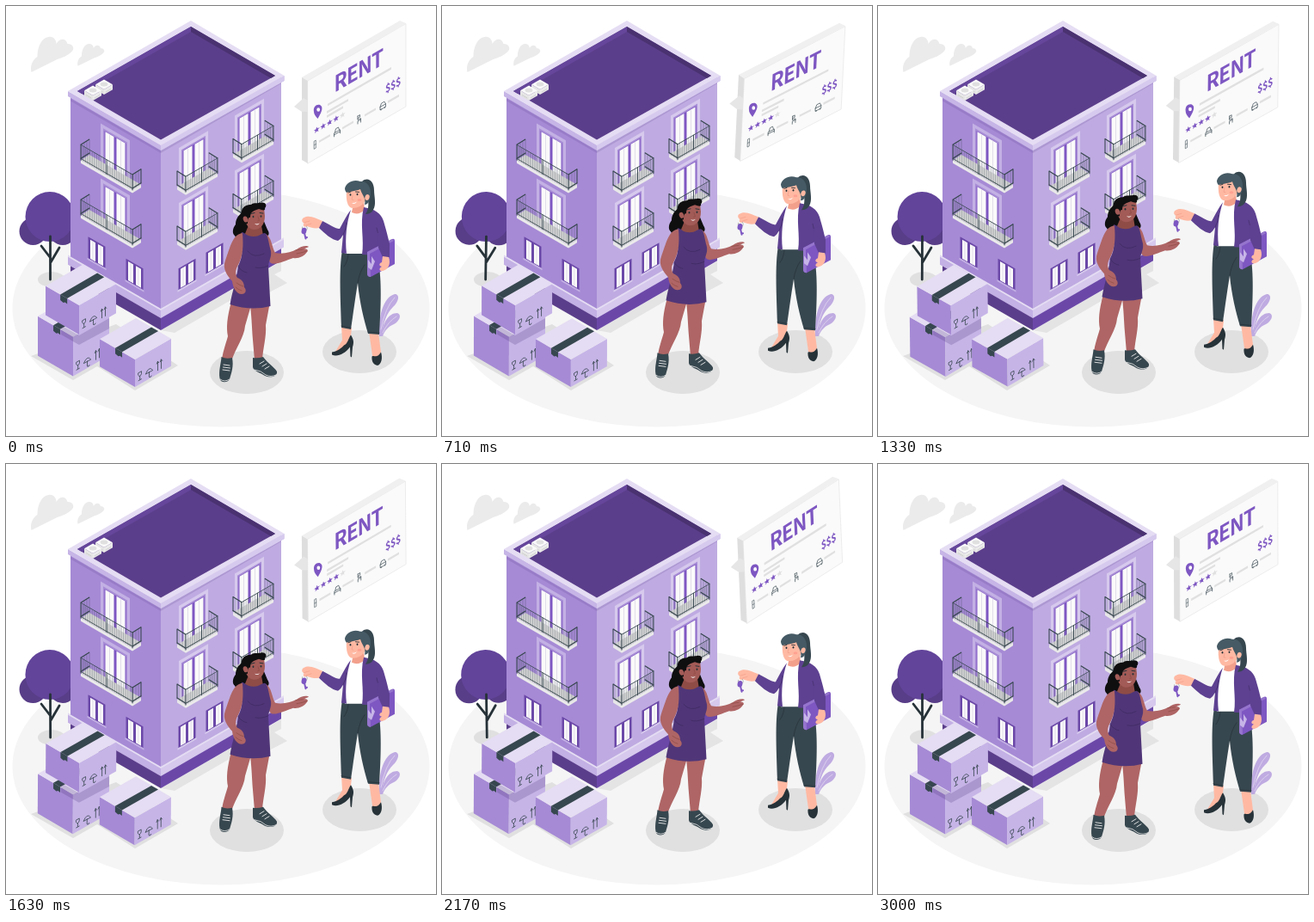
These frames come from a looping animation (500 px wide and 500 px high, 3040 ms). An HTML page with a canvas:

```html
<!DOCTYPE html>
<html lang="en">
<head>
<meta charset="utf-8">
<title>Rent</title>
<style>
html, body { margin: 0; width: 100%; height: 100%; overflow: hidden; background: #fff; }
canvas { display: block; width: 500px; height: 500px; }
</style>
</head>
<body>
<canvas id="stage"></canvas>
<script>
const LOOP = 3040, ISO = 0.577;
const canvas = document.getElementById('stage');
const c = canvas.getContext('2d');
const dpr = window.devicePixelRatio || 1;
canvas.width = canvas.height = 500 * dpr;

const BASE = '#7e57c2', DEEP = '#5b3e8b', DRESS = '#503678', PALE = '#e5ddf3',
  INK = '#263238', SLATE = '#37474f', GREY = '#e0e0e0';

// helpers
function fill(d, color) { c.fillStyle = color; c.fill(new Path2D(d)); }
function line(d, color, w = 1) {
  c.strokeStyle = color; c.lineWidth = w; c.lineCap = c.lineJoin = 'round';
  c.stroke(new Path2D(d));
}
function rect(x, y, w, h, color) { c.fillStyle = color; c.fillRect(x, y, w, h); }
function oval(x, y, rx, ry, color, turn = 0) {
  c.fillStyle = color; c.beginPath(); c.ellipse(x, y, rx, ry, turn, 0, 7); c.fill();
}
function at(x, y, draw) { c.save(); c.translate(x, y); draw(); c.restore(); }
function slanted(x, y, draw, flip = 1) {
  at(x, y, () => { c.scale(flip, 1); c.transform(1, -ISO, 0, 1, 0, 0); draw(); });
}
function turned(x, y, deg, draw) {
  c.save(); c.translate(x, y); c.rotate(deg * Math.PI / 180); c.translate(-x, -y);
  draw(); c.restore();
}
// block standing on its front corner (x, y)
function block(x, y, l, r, h, top, left, right) {
  const a = l * ISO, b = r * ISO;
  fill(`M${x} ${y}l${-l} ${-a}v${-h}l${l} ${a}z`, left);
  fill(`M${x} ${y}l${r} ${-b}v${-h}l${-r} ${b}z`, right);
  fill(`M${x} ${y - h}l${-l} ${-a}l${r} ${-b}l${l} ${a}z`, top);
}

function ground() {
  oval(250, 351.5, 242.5, 138, '#f5f5f5');
  fill('M180 377L320 297V308L312 312L327 322L306 333L296 322L196 380Z', '#e4e4e4');
  fill('M29 407L78 435L106 419L150 447L200 418L128 370Z', GREY);
  oval(53, 318, 16, 9, GREY);
  oval(280, 426, 43, 25, GREY);
  oval(411, 402, 43, 25, GREY);
}

function cloud() {
  fill('M0 41C-2 33 2 26 7 23C7 11 12 1 20 0C26 -1 29 4 29 8C33 1 40 1 42 8C48 8 51 13 47 17C42 22 36 24 30 26Z', '#ebebeb');
}
function clouds() {
  at(29.5, 36, cloud);
  at(83.5, 44, () => { c.scale(0.63, 0.63); cloud(); });
}

function tree() {
  oval(31.5, 262, 16, 16, '#583d88');
  oval(66, 262, 16, 16, '#583d88');
  oval(51, 245, 28.5, 29, '#62449a');
  line('M51.5 318V268M51 292L41 279M52 298L62 281', INK, 2.8);
}

// wall parts, in wall coordinates: u runs away from the corner, v runs down
function panes(u, v, w, h) {
  const p = (w - 3) / 2;
  for (const x of [u, u + p + 3]) {
    rect(x, v, p, h, '#fafafa');
    rect(x + p * 0.45, v, 0.8, h, '#dcd6e6');
  }
}
function door(u, v, trim) {
  rect(u, v, 34, 50, trim);
  rect(u + 3, v + 4, 28, 46, '#a88dd6');
  rect(u + 4.5, v + 6, 25, 44, BASE);
  panes(u + 5.5, v + 6.5, 23, 43);
}
function hatch(u, v, w, trim) {
  rect(u - 0.5, v, w, 25, '#6b48a8');
  panes(u + 2, v + 2, w - 5, 22);
  rect(u - 1.5, v + 25, w + 2, 2, trim);
}
function balcony(u, v, w) {
  const f = u + 10, s = v + 12;
  fill(`M${u} ${v}h${w}l10 12h${-w}z`, '#d6d6d6');
  fill(`M${u} ${v}l10 12v3.500l-10 -12z`, '#e8e8e8');
  rect(f, s, w, 3.5, '#ebebeb');
  let bars = '';
  for (let x = 0; x <= w; x += 2.6) bars += `M${f + x} ${s - 17}v16`;
  for (let k = 0; k < 1; k += 0.3) bars += `M${u + 10 * k} ${v - 17 + 12 * k}v16M${u + w + 10 * k} ${v - 17 + 12 * k}v16`;
  line(bars, 'rgba(55,71,79,.6)', 0.45);
  line(`M${u} ${v - 18}l10 12h${w}l-10 -12M${u} ${v - 2}l10 12h${w}l-10 -12`, SLATE, 0.9);
  line(`M${f} ${s - 18}v18M${f + w} ${s - 18}v18M${f + w / 2} ${s - 18}v17M${u} ${v - 18}v16`, SLATE, 0.9);
}
function wall(flip, w, color, trim, doors, decks, deckW, small, base) {
  slanted(180, 162, () => {
    rect(0, 0, w, 192, color);
    rect(0, 200, w, 15, base);
    rect(0, 190, w + 3, 11, trim);
    rect(0, 190, w + 3, 2, PALE);
    for (const u of small) hatch(u, 155, 20, trim);
    for (const floor of [0, 64]) {
      for (const u of doors) door(u, 15 + floor, trim);
      for (const u of decks) balcony(u, 59 + floor, deckW);
    }
    rect(0, 6, w, 3, 'rgba(80,50,130,.16)');
  }, flip);
}
function building() {
  wall(-1, 105, '#a68ad5', '#c3b0e4', [36], [23], 60, [21, 65], DEEP);
  wall(1, 140, '#bfabe1', '#d6c9ed', [21, 86], [19, 84], 37, [21, 53], '#6b48a8');
  fill('M72 99L180 161.500L323.500 81V87L180 168L72 105Z', '#c6b5e6');
  fill('M180 161.500L323.500 81V87L180 168Z', '#d6caee');
  fill('M72 99L215 17L323.500 81L180 162Z', PALE);
  fill('M83 99L215 24L313 81L180 155.500Z', DEEP);
  fill('M215 24L313 81L308 84L215 30Z', '#4a3271');
  fill('M83 99L215 24V30L88 102Z', '#65469b');
  for (const [x, y] of [[114, 103], [101, 110]]) {
    block(x, y, 10, 10, 6, '#fafafa', '#e6e6e6', '#ebebeb');
    oval(x, y - 12, 4.4, 2.5, '#e0e0e0');
    line(`M${x + 2} ${y - 3}l6 -3.500M${x - 2} ${y - 3}l-6 -3.500`, '#bdbdbd', 0.6);
  }
}

function star(x, y, r, color) {
  c.fillStyle = color; c.beginPath();
  for (let i = 0; i < 10; i++) {
    const a = i * Math.PI / 5 - Math.PI / 2, q = i % 2 ? r * 0.42 : r;
    c.lineTo(x + q * Math.cos(a), y + q * Math.sin(a));
  }
  c.fill();
}
// lettering foreshortened like the isometric plane it lies on
function label(text, x, y, size) {
  c.save();
  c.translate(x, y); c.scale(0.866, 1);
  c.font = `bold ${size}px "Noto Sans CJK JP", "Noto Sans CJK SC", Roboto, sans-serif`;
  c.letterSpacing = -size / 26 + 'px';
  c.fillStyle = BASE; c.fillText(text, 0, 0);
  c.restore();
}
function board() {
  fill('M344 83L458 17L465 20L351 87Z', '#f0f0f0');
  fill('M344 83L351 87V183L344 179Z', '#dedede');
  fill('M335 117L346 107L351 110V123L344 123Z', '#e6e6e6');
  fill('M351 87L465 20.500V117L351 183Z', '#fafafa');
  line('M351 87L465 20.500V117L351 183Z', '#e6e6e6', 0.7);
  slanted(351, 86, () => {
    label('RENT', 30.5, 32.5, 26);
    label('$$$', 90, 67.5, 12.5);
    rect(23, 41, 74, 2.6, GREY);
    rect(22, 49, 25, 2.6, GREY);
    rect(22, 54, 19, 2.6, GREY);
    for (let i = 0; i < 5; i++) star(10.3 + i * 7.5, 64, 3.6, i < 4 ? BASE : GREY);
    for (const u of [13, 40, 66, 93]) rect(u, 78, 13, 2.6, GREY);
    line('M7.500 75.500h1.800v9H7.500zM7.500 80h1.800', SLATE, 0.5);
    line('M30.500 83.500v-4h7v4M31.500 79l1 -3.500h3l1 3.500M30.500 81.500h7', SLATE, 0.6);
    line('M58 75.500v4.500h3.500v4.500M58 84.500v-3h3.500M58 75.500h2.500v2.500h-2.500', SLATE, 0.6);
    line('M84 83v-3l1.500 -3.500h3.500l1.500 3.500v3zM84 80h6.500M85 83v1M89.500 83v1', SLATE, 0.6);
  });
  fill('M358 123C357 117 361 114 365 115C369 117 368 122 362.500 131C360 128 358 126 358 123Z', BASE);
  oval(363.2, 120.5, 1.9, 2.3, '#fff');
}

function carton(x, y, l, r, h) {
  block(x, y, l, r, h, PALE, '#a68ad5', '#c6b4e7');
  const tx = x - l * 0.56, ty = y - h - l * 0.56 * ISO;
  fill(`M${tx} ${ty}l8 4.600l${r} ${-r * ISO}l-8 -4.600z`, SLATE);
  fill(`M${tx} ${ty}l8 4.600v6.500l-2.500 -2l-2 .500l-3.500 -3z`, SLATE);
  slanted(x, y, () => {
    line('M4 -14h3.500v3q-1.700 3.500 -3.500 0zM5.700 -9.500v4M4 -5h3.500', SLATE, 0.7);
    line('M12.500 -8q4 -7.500 8 0zM16.500 -8v6q1.500 2 2.500 0', SLATE, 0.7);
    line('M26.500 -4v-10.500l-1.200 2.200M26.500 -14.500l1.200 2.200M30.500 -4v-10.500l-1.200 2.200M30.500 -14.500l1.200 2.200', SLATE, 0.7);
  });
}
function cartons() {
  carton(78, 430.5, 41, 42, 46);
  fill('M85 383L120 363V375L85 394L64 382V371Z', 'rgba(70,45,115,.22)');
  carton(85, 382, 39, 43, 34);
  carton(150, 443, 41, 42, 32);
}

function plant() {
  fill('M434 384C433 362 438 339 452 335C459 335 456 345 450 350C443 357 438 368 437 384Z', '#bfabe1');
  fill('M436 384C438 368 445 357 455 357C461 359 457 367 451 370C444 373 440 378 438 384Z', '#bfabe1');
  line('M436 376Q441 350 452 339M438 380Q444 367 454 361', PALE, 0.7);
}

function heels(skin) {
  fill('M390 373L402 376L400 393C396 400 389 405 382 405L391 390Z', skin);
  fill('M422 380L433 381L436 404L431 413L426 408Z', skin);
  fill('M379 404C386 403 390 399 393 396C397 395 398 388 401 384C404 389 405 392 403 398L402 410L400.500 409L400 398C394 406 385 410 379 407Z', INK);
  fill('M425.500 409C428 407 431 412 436 404C438 410 437 418 432 419.500C427 419 425 414 425.500 409Z', INK);
}
function agent() {
  const skin = '#ffb9a3', shade = '#f2a08c', coat = '#5e4191';
  at(0, -1.5, () => heels(skin));
  fill('M391 284C387 306 389 340 390 374L401 376C404 356 406 340 409 322C411 344 416 364 421 381L434 382C436 350 437 318 433 297L425 286Z', SLATE);
  line('M390 372L401 374M421 379L434 380M398 289Q397 298 393 303M409 322Q411 309 417 301', INK, 0.7);
  // blouse and coat
  fill('M398 238L418 234L418 288L394 288Z', '#fff');
  fill('M404 230L416 226L417 237Q410 244 402 240Z', shade);
  fill('M401 237C396 243 393 250 388 259C385 260 376 254 368 250L363 257C371 265 379 272 386 273C389 271 390 269 392 266L390 287L396 288C394 269 396 252 401 237Z', coat);
  fill('M416 234C429 236 436 241 439 250C443 264 447 277 446 286L443 296L433 293L430 290L414 289C417 271 411 254 416 234Z', coat);
  line('M431 258Q434 270 436 280M392 266Q396 258 396 252', '#46306e', 0.8);
  // folder
  fill('M420 286L449 271Q452 270 452 273V300L424 315Q420 315 420 311Z', BASE);
  fill('M420 286L449 271L451 273L423 288L424 315Q420 315 420 311Z', '#9575cd');
  fill('M421 295L425 300V291L429 297L425 307L421 304Z', '#c6b4e7');
  fill('M433 281L438 292L446 292L446 276L440 260L432 264Z', coat);
  fill('M438 291L445 292C448 300 444 307 438 308C434 309 433 305 437 303C433 302 434 299 437 298Z', skin);
  // hand with key
  fill('M368 250C360 247 352 242 345 247C343 250 345 252 347 252C344 255 347 258 350 256C355 258 360 259 364 258Z', skin);
  line('M346 252L353 250M349 255L355 253', shade, 0.7);
  line('M344.500 257a3 3.500 0 1 0 5 -1', '#9e9e9e', 0.7);
  oval(346.5, 261.5, 2.9, 3.8, BASE, 0.2);
  line('M347 264L348.500 270.500M348.500 269.500L350 269', BASE, 2);
  // head
  fill('M414 204C421 198 428 204 428 214C428 221 431 231 427 237C425 241 421 242 418 242C423 235 421 228 421 220Z', SLATE);
  fill('M396 215C395 225 397 235 403 235C409 235 415 232 418 226L420 211L408 207Z', skin);
  fill('M394 212C396 205 404 201 412 204C420 203 425 211 424 220C423 228 420 231 417 231C419 223 414 220 412 213C405 216 399 215 396 217C395 216 394 214 394 212Z', '#455a64');
  oval(420, 222.5, 2.6, 3.4, skin, 0.3);
  oval(400.5, 219.5, 0.9, 1.3, INK);
  oval(408.5, 219, 0.9, 1.3, INK);
  line('M398 217l3 -1M406.500 216l4 .400', INK, 0.9);
  line('M403 220l-1 5l2 .500', shade, 0.8);
  fill('M402 229Q405 229.500 408 227.500Q406 231.500 402 229Z', '#fff');
  oval(411, 225.5, 2.4, 1.5, '#ffa192');
}

function tenantHead(skin, shade, hair) {
  fill('M279 240C277 250 279 260 288 261C296 261 301 255 301 245L300 236L286 234Z', skin);
  fill('M275 247C271 240 276 231 285 232C288 229 294 231 297 229.500C302 229 304 233 301 236C302 239 299 239 294 237C288 239 284 240 284 247C282 246 281 249 281 254C278 255 276 251 275 247Z', hair);
  oval(278.5, 249, 2.7, 3.6, skin, -0.3);
  oval(287.5, 246, 0.9, 1.3, INK);
  oval(296.5, 245.5, 0.9, 1.3, INK);
  line('M285 242.500l4 -1M295 241.500l4 .600', INK, 1);
  line('M293 246l1.500 4.500l-2 .600', shade, 0.8);
  fill('M289 254Q292 255 295 253.500Q292 257 289 254Z', '#fff');
}
function tenant() {
  const skin = '#af6565', shade = '#8f4c46', hair = '#0f0f10';
  fill('M275 240C269 244 267 249 267 254C263 259 263 265 266 267C268 272 272 270 272 276C272 284 275 287 278 291L281 268L300 268C306 269 307 264 304 260L299 248Z', hair);
  // legs
  fill('M262 344C257 362 256 374 258 384C255 395 252 402 251 412L262 413C267 398 277 385 278 372L285 348Z', skin);
  fill('M284 348C286 367 286 376 287 388L289 412L298 411C299 396 303 385 302 371L307 344Z', skin);
  // shoes
  fill('M250.500 408Q256 411 263 409C265 419 262 427 260 434C257 439 249 438 248.500 433C247 424 250 416 250.500 408Z', SLATE);
  fill('M287 409Q293 410 299 408C304 415 312 420 315 425C316 431 307 433 301 430C296 426 288 425 287 420Z', SLATE);
  line('M249 434q5 4 11 0M289 423q8 1 13 6q6 3 12 0', '#eee', 0.8);
  line('M253 417l7 1M252.500 420l8 1M252 423l8 1M295 416l5 -3M298 419l5 -3M301 422l5 -3', '#eee', 0.9);
  // far arm
  fill('M302 265C309 269 309 280 313 287C322 289 332 286 338 283C343 279 350 278 352 280C351 281 349 281 347 282.500C350 282 352 284 350 286C347 291 340 294 334 293C325 296 313 302 308 299C303 294 301 280 302 265Z', skin);
  line('M338 288Q344 287 350 285M337 284l8 -1', shade, 0.7);
  // dress
  fill('M282 255L297 255L299 267Q290 276 277 267Z', shade);
  fill('M274 263C278 263 279 268 288 268C295 268 297 264 301 264C305 266 305 275 308 285C309 292 306 295 305 302L307.500 349Q285 355 260.500 347C263 332 268 319 270 302C276 291 275 282 272 273Z', DRESS);
  line('M281 285Q288 294 300 288M305 302Q296 306 290 304M270 303Q274 309 280 310', '#3f2a62', 0.8);
  // near arm
  fill('M275 264C263 266 261 280 255 296C251 306 258 314 263 320C264 328 268 335 274 335C279 335 280 330 277 327C277 321 274 318 269 316C266 311 267 306 270 301C276 290 276 278 275 264Z', skin);
  line('M268 322q4 3 8 4M267 327q3 3 7 4', shade, 0.7);
  at(0, -1, () => tenantHead('#a35b57', shade, hair));
}

// swing: 0, +1 at a quarter, -1 at three quarters, back to 0
function swing(p) { return p < 0.25 ? 4 * p : p < 0.75 ? 2 - 4 * p : 4 * p - 4; }

function draw(ms) {
  const p = (ms % LOOP) / LOOP, sway = swing(p), shake = swing(p * 2 % 1);
  const lift = -10 * (1 - Math.abs(1 - 2 * p));
  c.setTransform(dpr, 0, 0, dpr, 0, 0);
  rect(0, 0, 500, 500, '#fff');
  ground();
  clouds();
  turned(48, 266, sway, tree);
  building();
  turned(404, 101, 3 * sway, board);
  turned(114, 376, 1.3 * shake, cartons);
  plant();
  at(0, lift, agent);
  at(0, lift, tenant);
}

const start = performance.now();
function tick() {
  draw(performance.now() - start);
  requestAnimationFrame(tick);
}
draw(0);
requestAnimationFrame(tick);
</script>
</body>
</html>
```
